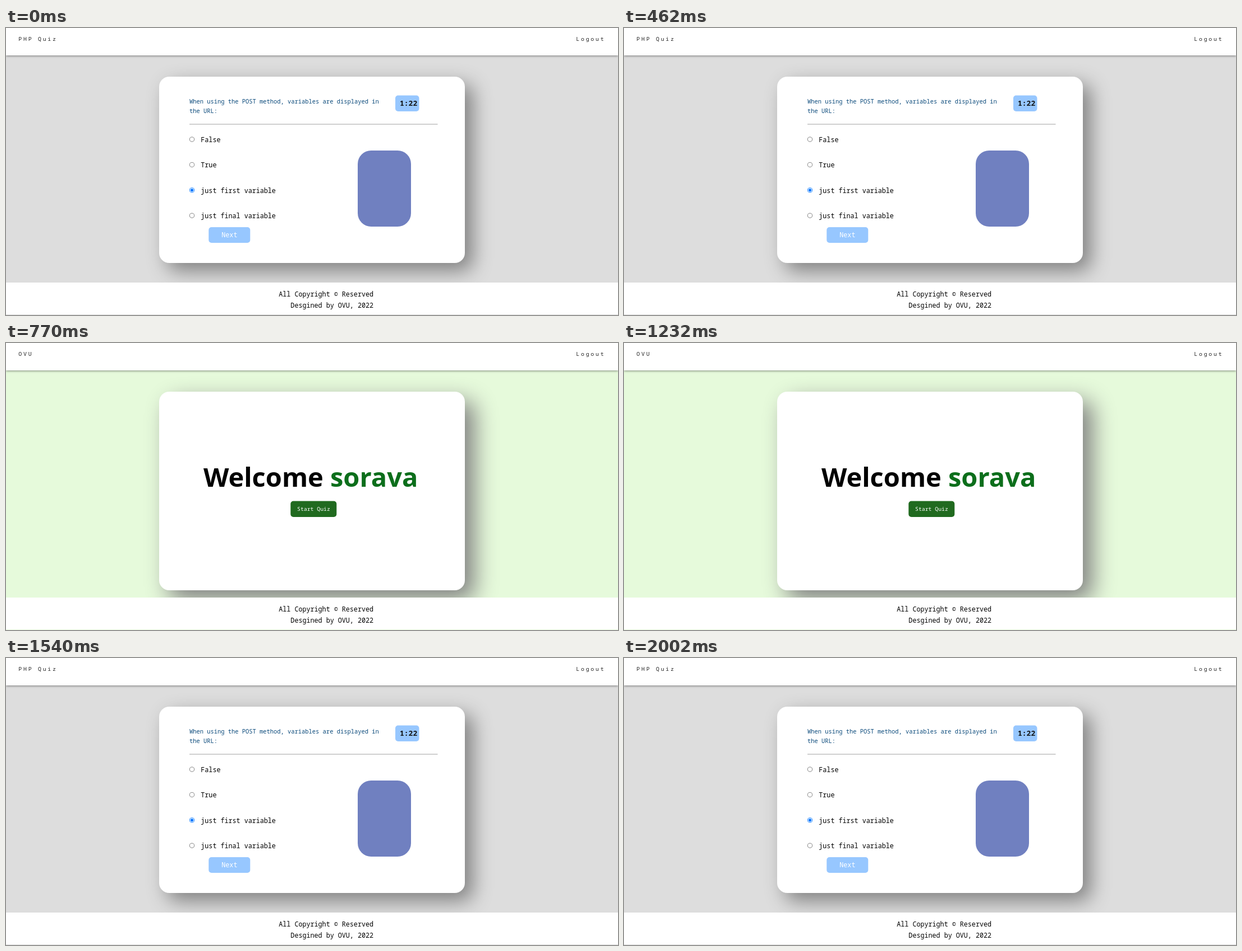
These frames come from a looping animation (1091x513 px, 2310 ms). An HTML page:

```html
<!DOCTYPE html>
<html lang="en">
<head>
<meta charset="utf-8">
<title>Quiz</title>
<style>
  html, body { margin: 0; width: 100%; height: 100%; overflow: hidden; }
  #stage { position: relative; width: 1091px; height: 513px; overflow: hidden; background: #ddd; }
  #stage.welcome { background: #e6fadb; }
  #stage > * { position: absolute; }
  nav { left: 0; top: 0; width: 1091px; height: 49px; background: #fff; box-shadow: 0 1px 4px #0007; }
  .card { left: 272.75px; top: 87px; width: 545.5px; height: 333px; border-radius: 18px;
          background: #fff; box-shadow: 14px 14px 35px gray; }
  .welcome .card { height: 355px; box-shadow: 17px 17px 40px gray; }
  footer { left: 0; top: 455px; width: 1091px; height: 57px; background: #fff; }
  svg { left: 0; top: 0; }
  text { font: 11.73px "Noto Sans Mono", monospace; white-space: pre; }
  .nav { font-size: 9.8px; letter-spacing: 2.8px; fill: #222; }
  .question { font-size: 10.43px; fill: #0b4a7b; }
  .timer { font-size: 13px; font-weight: 700; fill: #111; }
  .light { fill: #fff; font-weight: 500; }
  .start { font-size: 9.8px; }
  .title { font: 700 47px "Open Sans", sans-serif; }
  .right { text-anchor: end; }
  .welcome #quiz, #stage:not(.welcome) #welcome { display: none; }
</style>
</head>
<body>
<div id="stage">
  <div class="card"></div>
  <nav></nav>
  <footer></footer>
  <svg width="1091" height="513">
    <text class="nav" x="1016.3" y="23">Logout</text>
    <text class="right" x="655" y="480">All Copyright © Reserved</text>
    <text class="right" x="655" y="499.5">Desgined by OVU, 2022</text>

    <g id="quiz">
      <text class="nav" x="22.3" y="23">PHP Quiz</text>
      <text class="question" x="327" y="134.5">When using the POST method, variables are displayed in</text>
      <text class="question" x="327" y="151.5">the URL:</text>
      <rect x="694" y="120.5" width="42.5" height="28.5" rx="5" fill="#97c7ff"/>
      <text class="timer" x="702" y="139">1:22</text>
      <rect x="327" y="171.3" width="442.5" height="1.4" fill="#bbb"/>
      <g id="options"></g>
      <rect x="361.3" y="356" width="74" height="28" rx="5" fill="#97c7ff"/>
      <text class="light" x="384.3" y="374">Next</text>
      <rect x="627" y="219" width="95" height="136" rx="24" fill="#7080c0"/>
    </g>

    <g id="welcome">
      <text class="nav" x="22.3" y="23">OVU</text>
      <text class="title" x="352" y="257">Welcome</text>
      <text class="title" x="578" y="257" fill="#0c6e1b">sorava</text>
      <rect x="507.3" y="282.5" width="82" height="28.5" rx="5" fill="#206a1f"/>
      <text class="light start" x="519" y="300">Start Quiz</text>
    </g>
  </svg>
</div>
<script>
  const HOLD = 770, LOOP = 3 * HOLD;
  const answers = ["False", "True", "just first variable", "just final variable"];
  const chosen = 2;

  document.getElementById("options").innerHTML = answers.map((label, i) => {
    const y = 199 + i * 45.4;
    const color = i === chosen ? "#0075ff" : "#767676";
    const dot = i === chosen ? `<circle cx="331.5" cy="${y}" r="2.6" fill="${color}"/>` : "";
    return `<circle cx="331.5" cy="${y}" r="4.1" fill="#fff" stroke="${color}" stroke-width=".9"/>${dot}
      <text x="347.3" y="${y + 4.7}">${label}</text>`;
  }).join("");

  const stage = document.getElementById("stage");
  const start = performance.now();

  function draw() {
    const time = (performance.now() - start) % LOOP;
    stage.classList.toggle("welcome", Math.floor(time / HOLD) === 1);
    requestAnimationFrame(draw);
  }
  draw();
</script>
</body>
</html>
```
